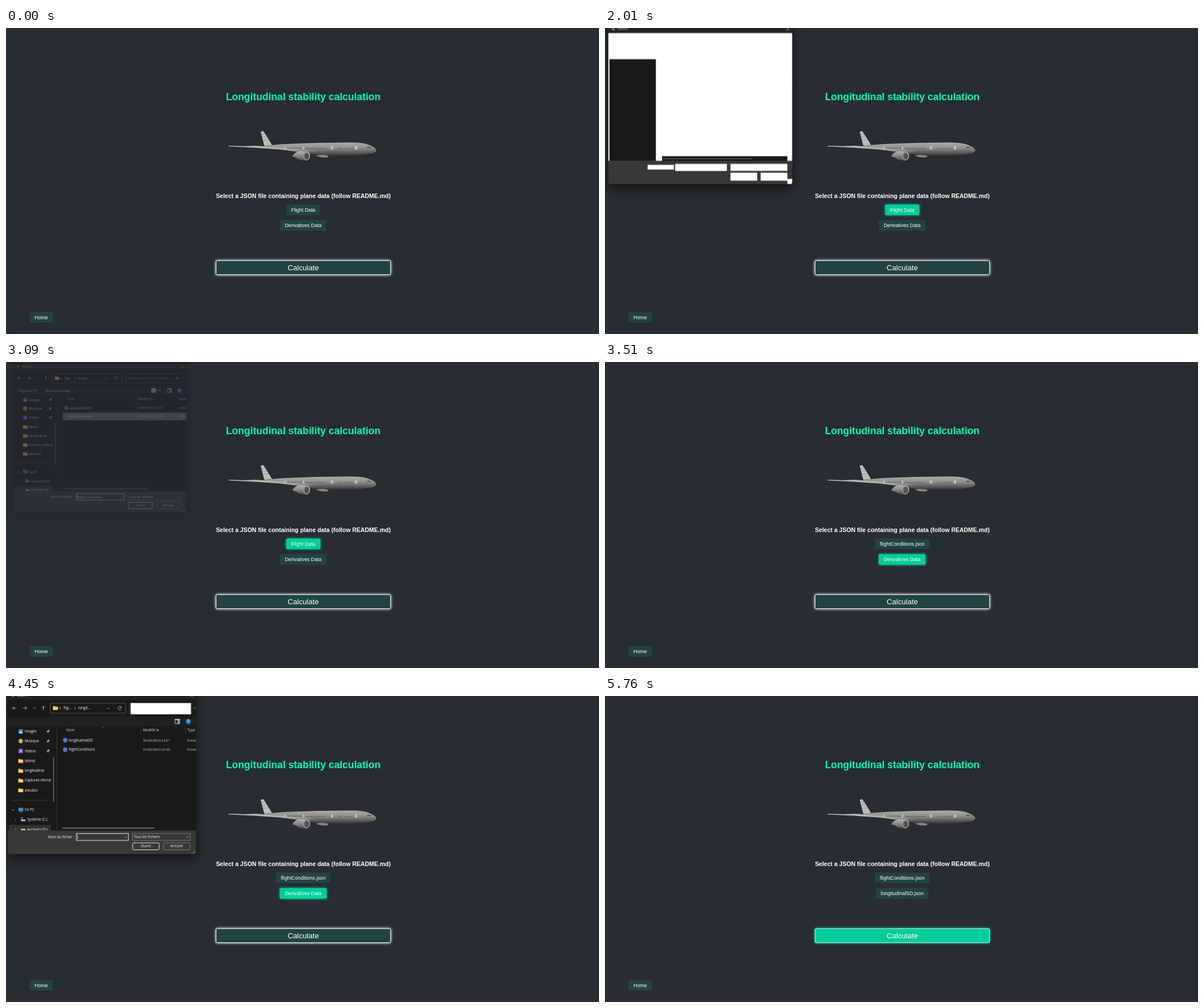
These frames come from a looping animation (1040x538 px, 8000 ms). An HTML page:

```html
<!DOCTYPE html>
<html lang="en">
<head>
<meta charset="utf-8">
<title>Longitudinal stability calculation</title>
<style>
html, body { margin: 0; width: 100%; height: 100%; overflow: hidden; background: #282c34; }
svg { display: block; width: 100%; height: 100%; }
text { fill: #fff; font: 8.78px "Liberation Sans", Arial, sans-serif; }
.mid { text-anchor: middle; }
.title { font-size: 17.45px; font-weight: bold; fill: #04fab3; }
.hint { font-size: 10.48px; font-weight: bold; }
.big { font-size: 13.1px; }
.btn { fill: #224343; }
.anim { animation: 8s step-end infinite; }

/* Page buttons: 1% of the loop is 80 ms */
.flight { animation-name: flight; }
.flight rect { animation: flight-hover 8s step-end infinite; }
.flight-file { animation-name: flight-file; }
.deriv { animation-name: deriv; }
.deriv rect { animation: deriv-hover 8s step-end infinite; }
.deriv-file { animation-name: deriv-file; }
.deriv-file rect { animation: deriv-file-hover 8s step-end infinite; }
.calc { stroke: #fff; filter: drop-shadow(0 0 2.4px #fff); animation: calc 8s linear infinite; }
@keyframes flight { 0% { opacity: 1 } 40% { opacity: 0 } }
@keyframes flight-file { 0% { opacity: 0 } 40% { opacity: 1 } }
@keyframes deriv { 0% { opacity: 1 } 67.25% { opacity: 0 } }
@keyframes deriv-file { 0% { opacity: 0 } 67.25% { opacity: 1 } }
@keyframes flight-hover {
  0% { fill: #224343; filter: none }
  18.125% { fill: #00cd9b; filter: drop-shadow(0 0 2.2px #00cd9b) }
}
@keyframes deriv-hover {
  0%, 17.5%, 64.375% { fill: #224343; filter: none }
  17%, 43.875% { fill: #00cd9b; filter: drop-shadow(0 0 2.2px #00cd9b) }
}
@keyframes deriv-file-hover {
  0%, 67.875% { fill: #224343; filter: none }
  67.25% { fill: #00cd9b; filter: drop-shadow(0 0 2.2px #00cd9b) }
}
@keyframes calc {
  0%, 69.3% { fill: #224343; stroke: #fff; filter: drop-shadow(0 0 2.4px #fff) }
  72%, 99.99% { fill: #00cd9b; stroke: #c9f8e9; filter: drop-shadow(0 0 2.4px #00e0aa) }
}

/* File dialog */
.dialog {
  transform-origin: 123px 112px;
  animation: zoom 8s infinite, fade 8s linear infinite;
  filter: drop-shadow(0 9px 9px rgba(0, 0, 0, .55));
}
@keyframes zoom {
  0%, 23.8125%, 39.25%, 53.6875%, 63.875%, 100% {
    transform: scale(.84); animation-timing-function: cubic-bezier(.33, 1, .68, 1);
  }
  26.9375%, 37.25%, 56.8125%, 62% { transform: none; animation-timing-function: ease-in; }
}
@keyframes fade {
  0%, 23.8125%, 39.25%, 53.6875%, 63.875%, 100% { opacity: 0 }
  24.75%, 37.25%, 54.6%, 62% { opacity: 1 }
}
.blank { animation-name: blank; }
.partial { animation-name: partial; }
@keyframes blank { 0%, 53% { opacity: 1 } 25.875%, 55.25% { opacity: 0 } }
@keyframes partial { 0%, 53% { opacity: 1 } 26.875%, 56.25% { opacity: 0 } }
.row1 { animation-name: row1; }
.row2 { animation-name: row2; }
@keyframes row1 {
  0%, 33.375% { fill: #191919 }
  31.625% { fill: #4d4d4d }
  60.75% { fill: #777 }
}
@keyframes row2 {
  0%, 31.625%, 45% { fill: #191919 }
  31.125% { fill: #4d4d4d }
  33.375% { fill: #777 }
}
.name1 { animation-name: name1; }
.name2 { animation-name: name2; }
@keyframes name1 { 0% { opacity: 0 } 60.75% { opacity: 1 } }
@keyframes name2 { 0%, 45% { opacity: 0 } 33.375% { opacity: 1 } }
.dialog text { font: 6.25px "Open Sans", "Noto Sans", sans-serif; }
.dialog .date { font-size: 5.95px; fill: #dedede; }
.dialog .dim { fill: #8f8f8f; }
.dialog .head { fill: #dedede; }
.line { fill: none; stroke: #e4e4e4; stroke-width: .8; }
.box { fill: none; stroke: #858585; stroke-width: .9; }
.rule { stroke: #4a4a4a; stroke-width: .8; }
</style>
</head>
<body>
<svg viewBox="0 0 1040 538">
<defs>
  <linearGradient id="hull" x1="0" y1="0" x2="0" y2="1">
    <stop offset="0" stop-color="#aaa"/><stop offset=".38" stop-color="#939393"/>
    <stop offset=".62" stop-color="#717171"/><stop offset="1" stop-color="#363636"/>
  </linearGradient>
  <linearGradient id="wing" x1="0" y1="0" x2="0" y2="1">
    <stop offset="0" stop-color="#c2c2c2"/><stop offset=".6" stop-color="#989898"/>
    <stop offset="1" stop-color="#555"/>
  </linearGradient>
  <linearGradient id="pod" x1="0" y1="0" x2="0" y2="1">
    <stop offset="0" stop-color="#b5b5b5"/><stop offset=".5" stop-color="#888"/>
    <stop offset="1" stop-color="#4a4a4a"/>
  </linearGradient>
  <clipPath id="frame"><rect x="2" y="-20" width="333" height="299.5" rx="4"/></clipPath>
  <clipPath id="side"><rect x="3" y="53" width="75.3" height="184.5"/></clipPath>
  <g id="folder">
    <path d="M0-3.4h3.2l1 1.2h4.3v5.8H0z" fill="#e0a030"/>
    <rect y="-1.6" width="8.5" height="5.2" rx=".6" fill="#ffd262"/>
  </g>
  <g id="pin" fill="#b5b5b5" transform="rotate(45)">
    <path d="M-1.3-3.2h2.6v3l1.2 1.3h-5l1.2-1.3z"/><path d="M-.3 1h.6v2.4h-.6z"/>
  </g>
  <path id="down" class="line" d="M-2-1 0 1 2-1"/>
  <path id="right" class="line" d="M-1-2 1 0-1 2"/>
</defs>

<rect width="1040" height="538" fill="#282c34"/>
<text class="title mid" x="521.3" y="127">Longitudinal stability calculation</text>

<g id="plane">
  <path d="M446.6 182.2 451.3 181.3 457 190 466.5 205.8 453 207.2z" fill="#bdbdbd"/>
  <path d="M448 187l6-1M449.5 192l8-1M451 197.5l10-1" stroke="#8f8f8f" stroke-width=".8"/>
  <path d="M451 208.3Q470 204.6 500 203.6L545 202 605 201.2Q623 201.2 634 204.5 648 209.5 649.7 215 649.5 218.7 641 220.8 620 224.7 578 224.3 540 223.5 515 218.5L478 212z" fill="url(#hull)"/>
  <path d="M419 207.7 437 206.9 463 208.8 458 209.8z" fill="#b8b8b8"/>
  <path d="M390 206.9 436 208.2 480 210 528 213.8 546 217 543 219.2 520 218.4 480 213.6 440 210.8 390.6 208.3z" fill="url(#wing)"/>
  <path d="M440 210.2 480 212.8 520 217.7" fill="none" stroke="#d0d0d0" stroke-width=".6"/>
  <path d="M543 224.3Q556 221.5 566 225L564 227.3Q553 229 545 225z" fill="#858585"/>
  <path d="M502 225.5Q507 217 517 216.3L529 217.2Q534.5 220 533.3 227.5 531 233 522 233 514 232.2 509 228z" fill="url(#pod)"/>
  <ellipse cx="527" cy="225.2" rx="5.4" ry="7.2" fill="#6b6b6b" stroke="#b4b4b4" stroke-width=".9"/>
  <ellipse cx="527.8" cy="225.4" rx="3.2" ry="5" fill="#4f4f4f"/>
  <path d="M494 211.3h25M526 211.6h36M582 211.8h8M594 211.8h15" stroke="#5c5c5c" stroke-width="1.3" stroke-dasharray="1.3 .8"/>
  <path d="M488 208.2h2.5v5H488zM520.3 208.2h2.8v5.5h-2.8zM569.8 207.8h3.8v6.2h-3.8zM612 207.5h4v6.5h-4z" fill="#bcbcbc"/>
  <path d="M633 210.7 635.5 208.6 637 210.7zM637.6 210.7 637.3 208.5 641.5 210.9z" fill="#333"/>
</g>

<text class="hint mid" x="521.4" y="299.2">Select a JSON file containing plane data (follow README.md)</text>

<g class="anim flight">
  <rect class="btn" x="491.3" y="310.4" width="60" height="18.6" rx="2"/>
  <text class="mid" x="521.3" y="322.9">Flight Data</text>
</g>
<g class="anim flight-file">
  <rect class="btn" x="473.5" y="310.4" width="96" height="18.6" rx="2"/>
  <text class="mid" x="521.3" y="322.9">flightConditions.json</text>
</g>
<g class="anim deriv">
  <rect class="btn" x="480.2" y="337.8" width="82" height="18.6" rx="2"/>
  <text class="mid" x="521.2" y="350.2">Derivatives Data</text>
</g>
<g class="anim deriv-file">
  <rect class="btn" x="475.3" y="337.8" width="92" height="18.6" rx="2"/>
  <text class="mid" x="521.3" y="350.2">longitudinalSD.json</text>
</g>
<rect class="btn calc" x="368.4" y="409" width="306" height="24.7" rx="2"/>
<text class="big mid" x="521.4" y="426">Calculate</text>
<rect class="btn" x="41.3" y="499.3" width="41" height="18.6" rx="2"/>
<text class="mid" x="61.8" y="511.5">Home</text>

<g class="dialog"><g clip-path="url(#frame)">
  <rect x="2" y="-20" width="333" height="300" fill="#191919"/>
  <rect x="2" y="-20" width="333" height="25.5" fill="#1f2227"/>
  <circle cx="11" cy="-1.8" r="2.6" fill="#777"/>
  <text x="18.5" y="-.2">Ouvrir</text>
  <path class="line" d="M324.2-4.3l5 5m0-5l-5 5"/>

  <!-- Navigation -->
  <path class="line" d="M17 20.5h-6.5m2.7-2.7-2.7 2.7 2.7 2.7M29 20.5h6.5m-2.7-2.7 2.7 2.7-2.7 2.7M65 23.7v-6.5m-2.7 2.7 2.7-2.7 2.7 2.7M202.5 19a2.8 2.8 0 1 0 .3 2.6m-.1-4.3v2h-2"/>
  <use href="#down" x="49.2" y="20.5"/>
  <rect class="box" x="77.2" y="12" width="133.5" height="17.5" style="stroke:#555"/>
  <use href="#folder" x="82" y="20"/>
  <text x="92.8" y="22.2">«</text><text x="101" y="22.8">flig...</text>
  <use href="#right" x="121" y="20.8"/>
  <text x="127" y="22.8">longit...</text>
  <use href="#down" x="180" y="21"/>
  <rect class="box" x="217.8" y="12" width="109.5" height="17.5" style="stroke:#555"/>
  <text class="dim" x="222" y="22.8">Rechercher dans : longitudi...</text>
  <path class="line" d="M314 23.6l2.2-2.3a1.8 1.8 0 1 1 .3.3"/>

  <!-- Toolbar -->
  <rect x="2" y="36.5" width="333" height="16" fill="#202020"/>
  <text x="12" y="46.4">Organiser</text>
  <path d="M42.5 42.8h4.6l-2.3 2.6zM281.5 42.8h4.6l-2.3 2.6z" fill="#ddd"/>
  <text x="63.8" y="46.4">Nouveau dossier</text>
  <path d="M267.5 40h9v8.3h-9z" fill="#ddd"/>
  <path d="M268.5 42.2h7m-7 2h7m-7 2h7" stroke="#555" stroke-width=".6"/>
  <path d="M297.5 40h9v8.3h-9z" fill="#eee"/>
  <path d="M298.3 41.5h4.2v6h-4.2z" fill="#222"/><path d="M303 41.5h2.8v6H303z" fill="#2f8fdc"/>
  <circle cx="321.6" cy="44.2" r="4.3" fill="#1d8fdc"/>
  <text class="mid" x="321.6" y="46.4">?</text>

  <!-- Folder tree -->
  <g clip-path="url(#side)">
    <rect x="4" y="227.7" width="75" height="11" fill="#333"/>
    <rect x="21" y="58" width="8" height="7.5" rx="1" fill="#2b8fe0"/>
    <path d="M21.8 65l3.2-4 3.2 4z" fill="#d9efff"/>
    <circle cx="25" cy="79" r="4.2" fill="#dd8a55"/>
    <path d="M24.4 81v-4l2.2.8" fill="none" stroke="#fff" stroke-width=".9"/>
    <rect x="21" y="92.5" width="8" height="8" rx="1" fill="#8a4fd3"/>
    <path d="M24 94.5l3.2 2-3.2 2z" fill="#fff"/>
    <use href="#folder" x="20.8" y="113.8"/><use href="#folder" x="20.8" y="131.2"/>
    <use href="#folder" x="20.8" y="148.6"/><use href="#folder" x="20.8" y="166"/>
    <text x="32" y="64">Images</text><text x="32" y="81.3">Musique</text>
    <text x="32" y="98.7">Vidéos</text><text x="32" y="116">lateral</text>
    <text x="32" y="133.4">longitudinal</text><text x="32" y="150.8">Captures d'écran</text>
    <text x="32" y="168.2">elevator</text>
    <use href="#pin" x="73" y="62"/><use href="#pin" x="73" y="79.3"/><use href="#pin" x="73" y="96.7"/>
    <path class="rule" d="M8 184h65"/>
    <use href="#down" x="11.5" y="201"/>
    <path d="M21 197.3h8.5v6H21zM23.5 204h3.6v1.3h-3.6z" fill="#2f9be6"/>
    <text x="32" y="203.2">Ce PC</text>
    <use href="#right" x="15.7" y="218.5" opacity=".6"/><use href="#right" x="15.7" y="236" opacity=".6"/>
    <rect x="25.5" y="214" width="3.2" height="3.2" fill="#2f9be6"/>
    <rect x="25.3" y="218" width="8" height="2.8" rx=".5" fill="#ccc"/>
    <rect x="25.3" y="234.7" width="8" height="2.8" rx=".5" fill="#ccc"/>
    <text x="36.5" y="220.6">Système (C:)</text><text x="36.5" y="238">Archives (D:)</text>
  </g>
  <path d="M83 107.5v79" stroke="#999" stroke-width="1"/>
  <path class="rule" d="M88.8 53v184.5M237.5 53v14M316.5 53v14" opacity=".8"/>

  <!-- File list -->
  <path d="M167.8 55.5l2-1.5 2 1.5" class="line" opacity=".5"/>
  <text class="head" x="106" y="62.2">Nom</text>
  <text class="head" x="241" y="62.2">Modifié le</text>
  <text class="head" x="319.8" y="62.2">Type</text>
  <rect class="anim row1" x="97" y="70" width="240" height="15" fill="#191919"/>
  <rect class="anim row2" x="97" y="86.8" width="240" height="14.8" fill="#191919"/>
  <circle cx="103.6" cy="77.3" r="3.9" fill="#6470dc"/><circle cx="103.6" cy="94.2" r="3.9" fill="#6470dc"/>
  <text x="110" y="79.5">longitudinalSD</text><text x="110" y="96.4">flightConditions</text>
  <text class="date" x="241" y="79.5">30/03/2023 23:01</text>
  <text class="date" x="241" y="96.4">31/03/2023 22:39</text>
  <text class="date" x="319.8" y="79.5">Fichier</text><text class="date" x="319.8" y="96.4">Fichier</text>
  <path d="M98.5 233.4H261.5" stroke="#9a9a9a" stroke-width="1.1"/>

  <!-- Footer -->
  <rect x="2" y="237.6" width="333" height="42" fill="#383838"/>
  <text x="73" y="251.2">Nom du fichier :</text>
  <rect class="box" x="123.2" y="243" width="92.3" height="12.2" style="stroke:#fff"/>
  <path class="line" d="M125.5 245v8"/>
  <text class="anim name1" x="126" y="251.2">longitudinalSD</text>
  <text class="anim name2" x="126" y="251.2">flightConditions</text>
  <use href="#down" x="210.8" y="249.5" opacity=".7"/>
  <rect class="box" x="222.6" y="243" width="102" height="12.2"/>
  <text x="224.8" y="251.2">Tous les fichiers</text>
  <use href="#down" x="320" y="249.2" opacity=".8"/>
  <rect class="box" x="223" y="259.5" width="46.8" height="12.3" rx="2" style="stroke:#fff"/>
  <rect class="box" x="277.6" y="259.5" width="46.8" height="12.3" rx="2"/>
  <text class="mid" x="246.4" y="267.6">Ouvrir</text><text class="mid" x="301" y="267.6">Annuler</text>
  <path d="M328.5 277.5h5M330.3 275.8h3.2M332 274h1.5" stroke="#aaa" stroke-width="1" stroke-dasharray="1 .7"/>

  <!-- Unpainted parts while the window opens -->
  <g class="anim partial">
    <path d="M2 36.5h293v16H2z" fill="#202020"/>
    <path d="M219.5 11.5h106.5v20H219.5z" fill="#fff"/>
    <path d="M331 20.7h3" class="line"/>
  </g>
  <g class="anim blank">
    <path d="M2 5.5h333v232H2z" fill="#fff"/>
    <path d="M4 53h84v184.6H4zM99 229h227v8.6H99z" fill="#191919"/>
    <path d="M2 237.6h333v42H2z" fill="#383838"/>
    <path d="M99 233.6h163" stroke="#777" stroke-width="1.1"/>
    <path d="M73 244.6h47.6v8.6H73zM123 242.8h93.6v13H123zM223 242.8h103v12.7H223zM223 258.8h48.4v14.4H223zM277.6 258.8H326v14.4h-48.4zM326 270.3h9v10h-9z" fill="#fff"/>
  </g>
</g></g>
</svg>
</body>
</html>
```
